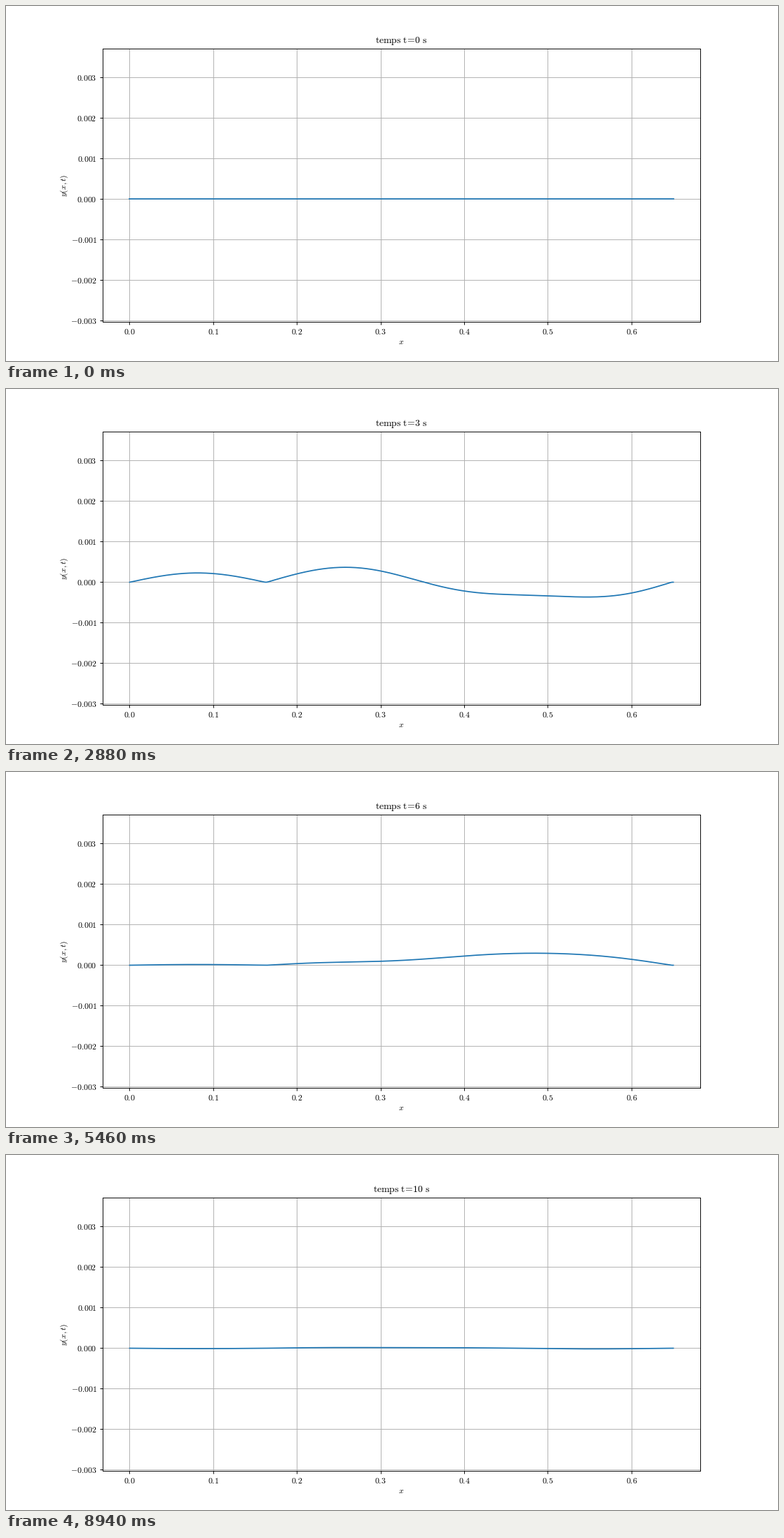
These frames come from a looping animation (1102 by 508 pixels, 9000 ms). A matplotlib script:

```python
import numpy as np
import matplotlib.pyplot as plt
from matplotlib.animation import FuncAnimation

W, H, DPI = 1102, 508, 80
FRAMES, INTERVAL = 150, 60
STEP = 1 / 15               # seconds of string time per picture
GAMMA = 0.46                # damping rate
LENGTH, NODE = 0.65, 0.163  # the string is also held at NODE
TURN = 1.2131               # phase of the slowest mode per picture
PHASE = 2.897               # its phase at release

plt.rcParams.update({
    "mathtext.fontset": "cm",
    "font.size": 10.6,
    "axes.linewidth": 0.85,
    "grid.linewidth": 0.85,
    "xtick.major.width": 0.85,
    "ytick.major.width": 0.85,
    "xtick.major.pad": 3.8,
    "ytick.major.pad": 3.8,
})


def standing(x, start, end, theta, amps, lags):
    """Sum of sine modes between two fixed points, in mm."""
    s = np.clip((x - start) / (end - start), 0, 1)
    return sum(a * np.cos(n * theta + lag) * np.sin(n * np.pi * s)
               for n, (a, lag) in enumerate(zip(amps, lags), 1))


def string(x, k):
    theta = TURN * k + PHASE
    left = standing(x, 0, NODE - .001, 3 * theta, [1.4], [4.34])
    right = standing(x, NODE + .001, LENGTH - .002, theta,
                     [4.1, 1.6, .35, .3, .12], [0, 3.05, -1.1, .35, -1])
    released = min(k, 1)
    return 1e-3 * released * np.exp(-GAMMA * k * STEP) * (left + right)


fig, ax = plt.subplots(figsize=(W / DPI, H / DPI), dpi=DPI)
fig.subplots_adjust(left=137.69 / W, right=991.35 / W, bottom=.11, top=.88)
ax.set_xlim(-0.05 * LENGTH, 1.05 * LENGTH)
ax.set_ylim(-0.003028, 0.003716)
xt = np.arange(7) / 10
yt = np.arange(-3, 4) / 1000
ax.set_xticks(xt, [f"${v:.1f}$" for v in xt])
ax.set_yticks(yt, [f"${v:.3f}$" for v in yt])
ax.grid(True)


def label(px, py, text, **style):
    return fig.text(px / W, 1 - py / H, text, ha="center", **style)


label(564.5, 484, "$x$", va="baseline")
label(83, 256.5, "$y(x,t)$", va="center", rotation=90)
title = label(564.7, 53.2, "", va="baseline", fontsize=12.35)

x = np.linspace(0, LENGTH, 400)
line, = ax.plot(x, 0 * x, color="#1f77b4", lw=1.57)


def update(k):
    line.set_ydata(string(x, k))
    title.set_text(rf"$\mathrm{{temps\ t\!=\!{round(k * STEP)}\ s}}$")
    return line, title


anim = FuncAnimation(fig, update, frames=FRAMES, interval=INTERVAL,
                     repeat=True, repeat_delay=0)
plt.show()
```
